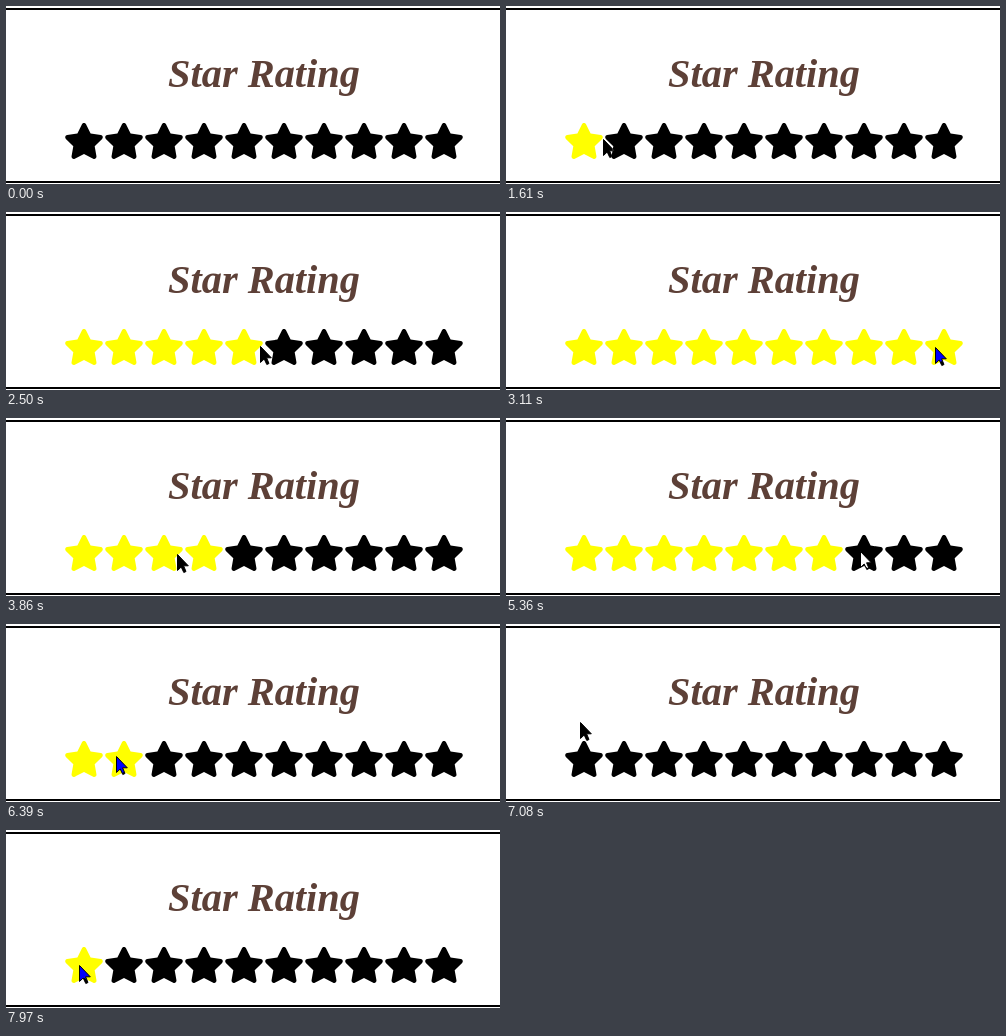
Animation of 494 by 178 pixels, one loop 8 s. Source, as an HTML page:

```html
<!DOCTYPE html>
<html lang="en">
<head>
<meta charset="utf-8">
<title>Star Rating</title>
<style>
  html, body { margin: 0; width: 100%; height: 100%; overflow: hidden; background: #fff; }
  svg { display: block; isolation: isolate; }
  text { font: italic bold 40.4px "Liberation Serif", "Times New Roman", serif; fill: #5d4037; }
  .invert { fill: #fff; mix-blend-mode: difference; }
  .outline { fill: none; stroke: #000; }
</style>
</head>
<body>
<svg width="494" height="178" viewBox="0 0 494 178">
  <defs>
    <path id="star" transform="scale(.0703125)" d="M259.3 17.8L194 150.2 47.9 171.5c-26.2 3.8-36.7 36.1-17.7 54.6l105.7 103-25 145.5c-4.5 26.3 23.2 46 46.4 33.7L288 439.6l130.7 68.7c23.2 12.2 50.9-7.4 46.4-33.7l-25-145.5 105.7-103c19-18.5 8.5-50.8-17.7-54.6L382 150.2 316.7 17.8c-11.7-23.6-45.6-23.9-57.4 0z"/>
    <path id="arrow" d="M.5 .5V16.5L4.2 13 6.8 18.5 9 17.5 6.6 11.8H11.3Z"/>
  </defs>
  <rect width="494" height="178" fill="#fff"/>
  <path d="M0 3H494M0 176H494" stroke="#000" stroke-width="2"/>
  <text x="162" y="81">Star Rating</text>
  <g id="stars"></g>
  <use class="invert pointer" href="#arrow"/>
  <use class="outline pointer" href="#arrow"/>
</svg>
<script>
const LOOP = 8000, STEP = 70, LAG = 0.6;
const PITCH = 40, LEFT = 58, TOP = 117, BOTTOM = 153;

// Where the pointer rests, and when it travels there
const stops = [
  { start: 0, end: 0, x: 102, y: 178 },
  { start: 500, end: 1190, x: 79, y: 133 },
  { start: 1540, end: 1750, x: 108, y: 133 },
  { start: 1900, end: 1960, x: 116, y: 133 },
  { start: 2220, end: 2980, x: 377, y: 135 },
  { start: 3040, end: 3110, x: 429, y: 135 },
  { start: 3510, end: 4260, x: 93, y: 136 },
  { start: 4390, end: 4600, x: 67, y: 136 },
  { start: 4860, end: 5640, x: 433, y: 132 },
  { start: 5980, end: 6660, x: 66, y: 132 },
  { start: 6940, end: 7360, x: 80, y: 69 },
  { start: 7760, end: 7970, x: 73, y: 135 },
];

const stars = Array.from({ length: 10 }, (_, i) => {
  const star = document.createElementNS("http://www.w3.org/2000/svg", "use");
  star.setAttribute("href", "#star");
  star.setAttribute("x", 57.75 + i * PITCH);
  star.setAttribute("y", TOP);
  return document.getElementById("stars").appendChild(star);
});
const pointers = document.querySelectorAll(".pointer");

// Stepped ease-out between two stops; moves to the left slow down harder
function pointerAt(time, lag) {
  const i = stops.findLastIndex(stop => time >= stop.start);
  const to = stops[i], from = stops[i - 1] || to;
  const steps = Math.round((to.end - to.start) / STEP) + 1;
  const step = Math.min(steps, Math.floor((time - to.start) / (to.end - to.start || 1) * (steps - 1) + 1.01));
  const p = 1 - (1 - (step - lag) / steps) ** (to.x > from.x ? 1.4 : 2.1);
  return [from.x + (to.x - from.x) * p, from.y + (to.y - from.y) * p];
}

function draw() {
  const time = performance.now() % LOOP;
  const [x, y] = pointerAt(time, LAG);
  const rating = y >= TOP && y < BOTTOM ? Math.floor((x - LEFT) / PITCH) + 1 : 0;
  stars.forEach((star, i) => star.setAttribute("fill", i < rating ? "#ff0" : "#000"));
  const tip = pointerAt(time, 0).map(Math.round);
  pointers.forEach(p => p.setAttribute("transform", `translate(${tip})`));
  requestAnimationFrame(draw);
}
draw();
</script>
</body>
</html>
```
